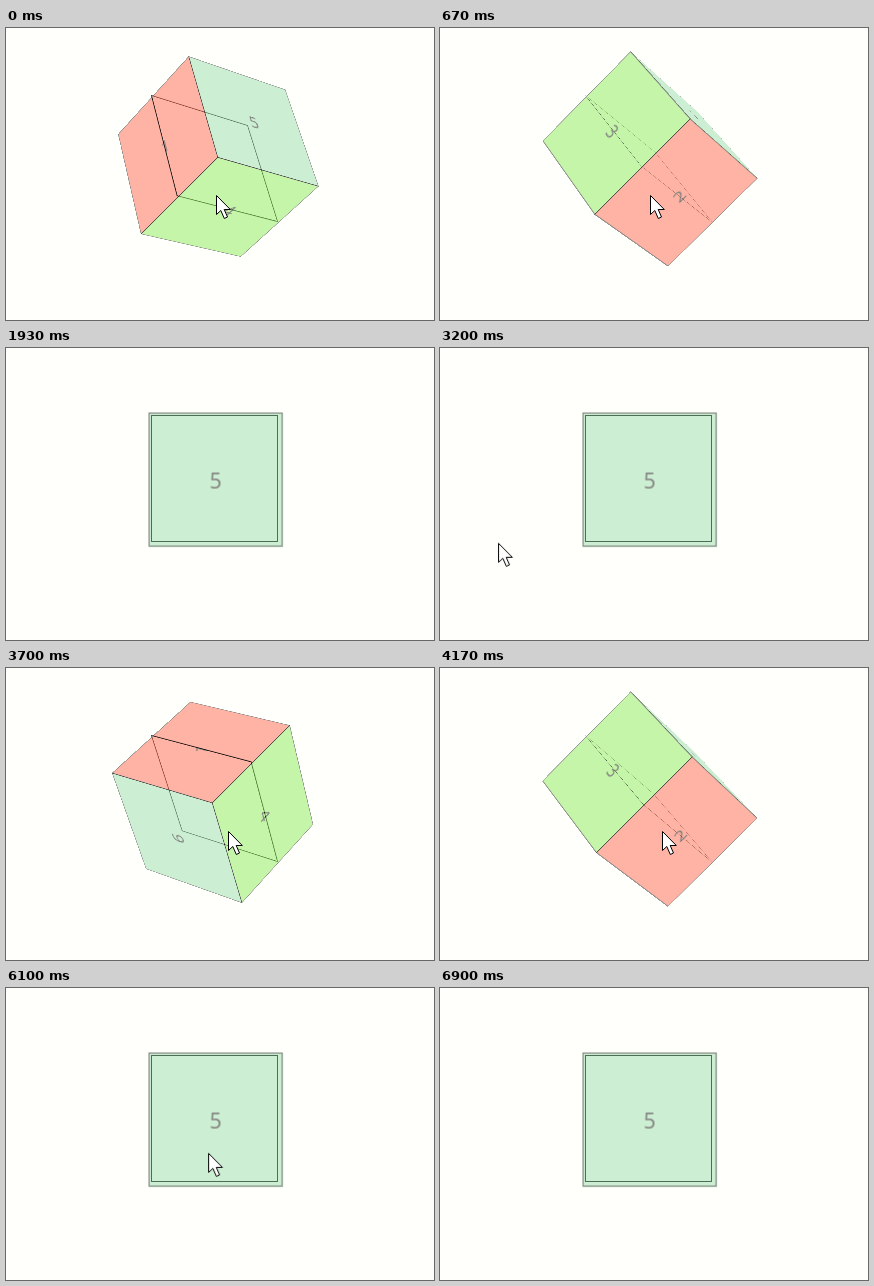
Animation, 428 px wide and 292 px high, one loop 7410 ms. Source, as an HTML page:

```html
<!DOCTYPE html>
<html lang="en">
<head>
<meta charset="utf-8">
<title>Rolling cube</title>
<style>
  html, body { margin: 0; width: 100%; height: 100%; overflow: hidden; background: #fffffc; }
  .stage {
    position: absolute; left: 0; top: 0; width: 428px; height: 292px; overflow: hidden;
    perspective: 1200px; perspective-origin: 209px 131px;
  }
  .cube {
    position: absolute; left: 145px; top: 67px; width: 125px; height: 125px;
    border: 1px solid #000; transform-style: preserve-3d;
  }
  .face {
    position: absolute; left: 0; top: 0; width: 125px; height: 125px;
    border: 1px solid #000; opacity: .5; backface-visibility: hidden;
    font: 20px/127px "Open Sans", sans-serif; text-align: center; color: #000;
  }
  .left, .right { background: #fd654b; }
  .top, .bottom { background: #89eb55; }
  .front, .back { background: #99dda9; }
  .left { transform: rotateY(-90deg) translateZ(63px); }
  .right { transform: rotateY(90deg) translateZ(63px); }
  .top { transform: rotateX(90deg) translateZ(63px); }
  .bottom { transform: rotateX(-90deg) translateZ(63px); }
  .front { transform: translateZ(63px); }
  .back { transform: rotateY(180deg) translateZ(63px); }
  .cursor { position: absolute; left: 0; top: 0; width: 17px; height: 25px; overflow: visible; }
</style>
</head>
<body>
<div class="stage">
  <div class="cube">
    <div class="face left">1</div>
    <div class="face right">2</div>
    <div class="face top">3</div>
    <div class="face bottom">4</div>
    <div class="face front">5</div>
    <div class="face back">6</div>
  </div>
  <svg class="cursor" viewBox="0 0 17 25">
    <path d="M.5 .5V19.5L4.8 15.5L8.3 23.5L11.5 22L8.2 14.5H14.3Z" fill="#fff" stroke="#000"/>
  </svg>
</div>
<script>
  const LOOP = 7410;
  const SPIN = 2000;
  // The first spin is already under way when the loop begins.
  const SPIN_STARTS = [-215, 3278];
  const AWAY = [-40, 185];

  // time in ms, x, y of the pointer tip
  const pointerPath = [
    [0, 210, 167], [1730, 210, 167], [1930, -18, 185], [1930, ...AWAY],
    [3200, ...AWAY], [3200, 57, 195], [3285, 145, 178], [3400, 222, 163],
    [6075, 222, 163], [6300, 50, 179], [6300, ...AWAY], [LOOP, ...AWAY]
  ];

  const animatePaused = (selector, frames, options) => {
    const animation = document.querySelector(selector).animate(frames, { fill: 'both', ...options });
    animation.pause();
    return animation;
  };

  const pointer = animatePaused('.cursor',
    pointerPath.map(([t, x, y]) => ({ offset: t / LOOP, transform: `translate(${x}px, ${y}px)` })),
    { duration: LOOP });

  const spin = animatePaused('.cube',
    [0, 360].map(angle => ({ transform: `rotate3d(1, 1, 0, ${angle}deg)` })),
    { duration: SPIN, easing: 'cubic-bezier(.32, .4, .37, 1)' });

  const start = performance.now();

  function draw() {
    const t = (performance.now() - start) % LOOP;
    const spinStart = SPIN_STARTS[t < SPIN_STARTS[1] ? 0 : 1];
    pointer.currentTime = t;
    spin.currentTime = Math.min(t - spinStart, SPIN);
    requestAnimationFrame(draw);
  }
  draw();
</script>
</body>
</html>
```
